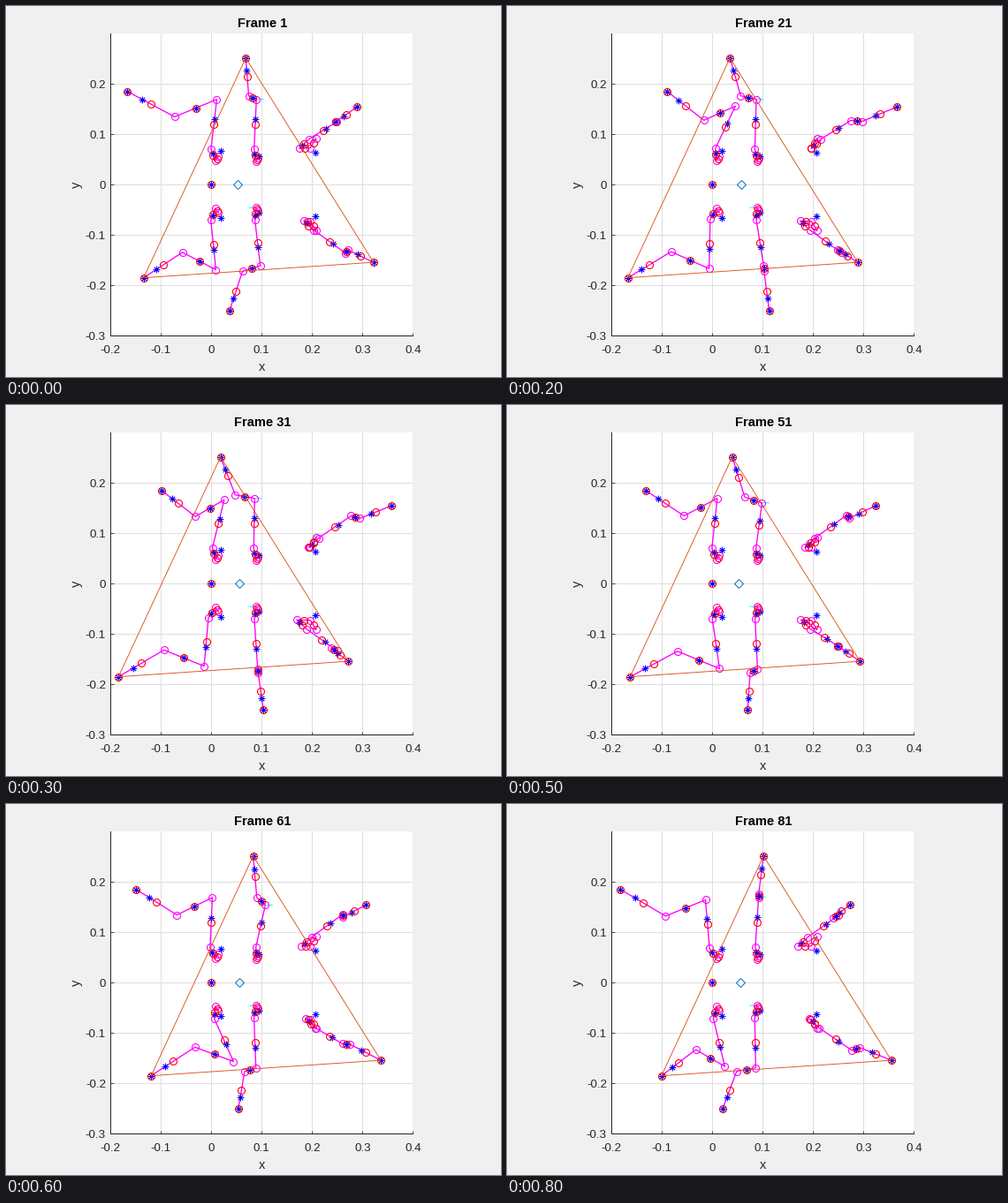
A matplotlib script that plays this animation: 560x420 px, repeating every 900 ms.

```python
import numpy as np
import matplotlib.pyplot as plt
from matplotlib.animation import FuncAnimation

W, H, DPI = 560, 420, 100
PX = 72 / DPI                    # points per pixel
LEFT, TOP, SIDE = 118.15, 31, 342.3
UNIT = SIDE / 0.6                # pixels per axis unit
INK = "#262626"
THIGH = 57                       # thigh length in pixels

plt.rcParams["font.family"] = "Liberation Sans"

# Lengths in pixels from the body origin, for a leg on the upper side.
# knee and foot are mid-stance positions; drive is knee motion per foot travel;
# raise is knee motion at full lift; bend offsets the shin joint from halfway
# between knee and foot; mass gives (link, fraction) counted from the base.
LEGS = {
    "rear": dict(base=(8, 32), hip=(4.5, 27), lean=-5.1, star=(11, 38),
                 knee=(5, 96.5), drive=0.47, lift=(16, 0),
                 bend=(3, -24.3), foot=(-77, 105.5),
                 mass=[(1, 0.6), (2, 0.6), (3, 0.5), (4, 0.68)]),
    "mid": dict(base=(53, 30), hip=(50.5, 26), lean=-2.1, star=(54, 32),
                knee=(51, 96.5), drive=0.07, lift=(9.5, -7),
                bend=(-2.7, -19.4), foot=(38.5, 143.3),
                mass=[(1, 0.6), (2, 0.6), (3, 0.5), (4, 0.68)]),
    "front": dict(base=(118.5, 52), hip=(112, 41.5), lean=-7.5, star=(118, 36),
                  knee=(151.5, 77.5), drive=0.33, lift=(-6, -8),
                  bend=(-13, -8.7), foot=(183, 88),
                  mass=[(2, 0.3), (3, 0.6), (4, 0.5), (5, 0.37)]),
}
TRIPOD_A = [("mid", 1), ("rear", -1), ("front", -1)]
TRIPOD_B = [("rear", 1), ("front", 1), ("mid", -1)]


def gait(phase):
    """Foot travel and lift: a steady push back, then an eased swing forward."""
    p = (phase - 33) % 100 + 33
    u = np.clip((p - 39.3) / 36, 0, 1)
    swing = -30 + 29.5 * (1 - np.cos(np.pi * u))
    push = 0.5 - 0.95 * (p - 101)
    return max(-30, min(swing, push)), np.sin(np.pi * u ** 1.3)


def leg_points(name, side, phase):
    """Joint chain from base to foot, and the mass points of one leg."""
    leg = LEGS[name]
    travel, lift = gait(phase)
    hip = np.array(leg["hip"])
    foot = np.array(leg["foot"]) + (travel, 0)

    shift = leg["drive"] * travel + leg["lift"][0] * lift
    drop = leg["lift"][1] * lift - shift ** 2 / THIGH
    knee = np.array(leg["knee"]) + (shift, drop)
    shin = (knee + foot) / 2 + leg["bend"]

    if name == "front":
        arm = hip + (leg["lean"] + 0.28 * travel, -0.3)
        coxa = [arm, arm + (11.2, 10.3)]
    else:
        dx = leg["lean"] + 0.2 * shift
        coxa = [hip + (dx, np.sqrt(14 ** 2 - dx ** 2))]

    chain = np.vstack([leg["base"], hip, *coxa, knee, shin, foot])
    mass = [chain[i] + t * (chain[i + 1] - chain[i]) for i, t in leg["mass"]]
    mass = np.vstack([mass, leg["star"], foot])
    flip = np.array([1, side])
    return chain * flip, mass * flip


fig = plt.figure(figsize=(W / DPI, H / DPI), dpi=DPI, facecolor="#f0f0f0")
ax = fig.add_axes([LEFT / W, 1 - (TOP + SIDE) / H, SIDE / W, SIDE / H])
ax.set(xlim=(-0.2, 0.4), ylim=(-0.3, 0.3))
ax.set_xticks(np.arange(-2, 5) / 10)
ax.set_yticks(np.arange(-3, 3) / 10)
ax.tick_params(direction="in", length=3.5 * PX, width=0.8 * PX, color=INK,
               labelbottom=False, labelleft=False)
ax.grid(color="#dedede", linewidth=1 * PX)
ax.set_axisbelow(True)
for edge in ("top", "right"):
    ax.spines[edge].set_visible(False)
for edge in ("left", "bottom"):
    ax.spines[edge].set(color=INK, linewidth=1 * PX)


def label(x, y, text, size=13.33, **kw):
    kw = {"ha": "center", "va": "baseline", "color": INK, **kw}
    return fig.text(x / W, 1 - y / H, text, fontsize=size * PX, **kw)


for k in range(-2, 5):
    label(LEFT + (k / 10 + 0.2) * UNIT, 393.3, f"{k / 10:g}")
for k in range(-3, 3):
    label(113, TOP + (0.3 - k / 10) * UNIT + 4.9, f"{k / 10:g}", ha="right")
label(290, 413, "x", 14.67)
label(80, 202.5, "y", 14.67, rotation=90, va="center")
title = label(290, 24, "", 14.67, weight="bold", color="black")


def layer(color, marker="None", line="None", width=1.1, size=8, z=3):
    return ax.plot([], [], color=color, marker=marker, linestyle=line,
                   linewidth=width * PX, markersize=size * PX,
                   markerfacecolor="none", markeredgewidth=width * PX,
                   zorder=z, clip_on=False)[0]


ticks = layer("#00ffff", line="-", width=0.9, z=2.5)
links = layer("#ff00ff", line="-", width=1.35, z=3)
joints = layer("#ff00ff", "o", z=4)
masses = layer("#0000ff", (8, 2, 0), width=0.85, size=7.5, z=5)
middles = layer("#ff0000", "o", z=6)
center = layer("#0072bd", "D", size=6.5, width=1, z=7)
support = layer("#d95319", line="-", width=0.9, z=8)
GAP = np.full((1, 2), np.nan)


def put(artist, points):
    artist.set_data(*(np.asarray(points) / UNIT).T)


def draw(i):
    n = 1 + 10 * i
    title.set_text(f"Frame {n}")

    lines, rings, mids, stars, feet, marks = [], [], [(0, 0)], [(0, 0)], [], []
    for tripod, phase in ((TRIPOD_A, n), (TRIPOD_B, n + 49)):
        for name, side in tripod:
            chain, mass = leg_points(name, side, phase)
            lines += [chain, GAP]
            rings.append(chain[:-1])
            mids += [*(chain[:-1] + chain[1:]) / 2, chain[-1]]
            stars += [*mass]
            if tripod is TRIPOD_A:
                feet.append(chain[-1])
            if name == "front":
                marks += [chain[0], chain[0] + (-3, 3 * side), GAP[0]]
            elif name == "mid":
                start = chain[3] if side > 0 else chain[1]
                marks += [start, start + (8 * side, 0), GAP[0]]

    put(links, np.vstack(lines))
    put(joints, np.vstack(rings))
    put(middles, mids)
    put(masses, stars)
    put(ticks, marks)
    put(support, feet + feet[:1])
    put(center, [(31.2 - 1.2 * np.cos(2 * np.pi * (n + 4) / 50), 0)])
    return title, links, joints, middles, masses, ticks, support, center


anim = FuncAnimation(fig, draw, frames=9, interval=100, repeat=True,
                     repeat_delay=0, blit=False)
plt.show()
```
